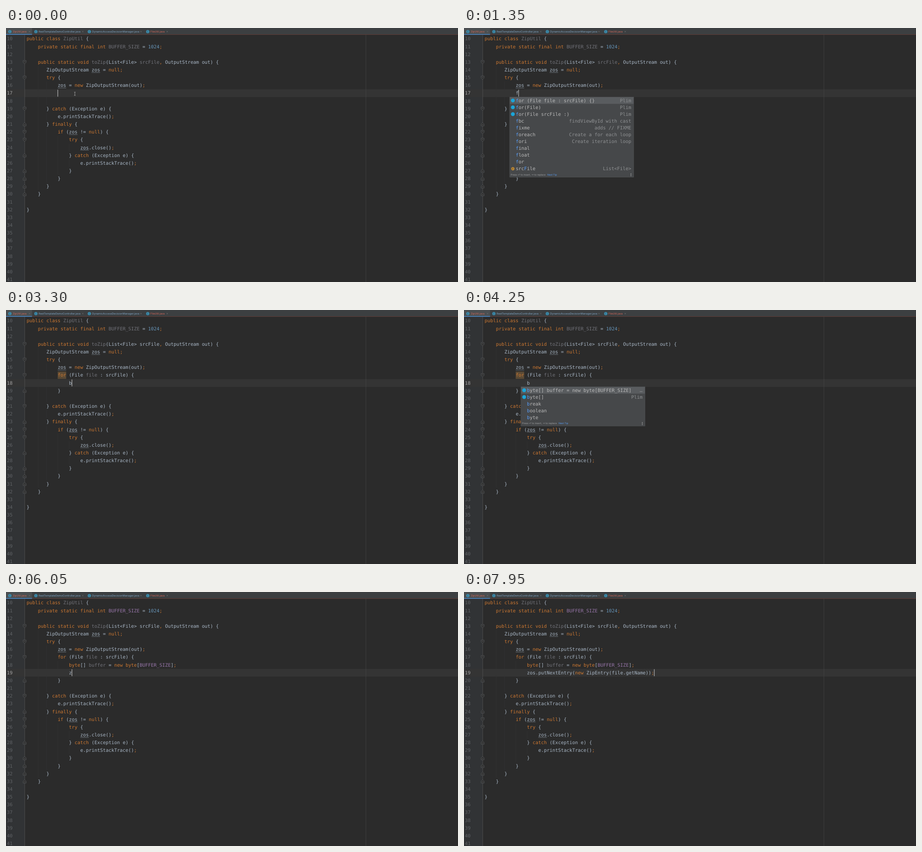
Recreate the animation shown at these times as an HTML page. Size 998x561 px, loop 8000 ms.

```html
<!DOCTYPE html>
<html lang="en">
<head>
<meta charset="utf-8">
<title>Code editor</title>
<style>
  html, body { margin: 0; width: 100%; height: 100%; overflow: hidden; background: #2b2b2b; }
  svg { display: block; width: 998px; height: 561px; }
  text { white-space: pre; text-rendering: geometricPrecision; }
  .code { font: 10.364px "DejaVu Sans Mono", monospace; }
  .ui { font-family: Inter, sans-serif; }
</style>
</head>
<body>
<svg id="stage" viewBox="0 0 998 561"></svg>
<script>
const LOOP = 8000, X0 = 45.5, CH = 6.24, TOP = 15.4, ROW = 17.15, FIRST = 10;
const C = {
  text: '#a9b7c6', key: '#cc7832', num: '#6897bb', dim: '#72737a', field: '#9876aa',
  match: '#589df6', pop: '#bbbbbb', tail: '#8f9193', logo: '#1ba5d8', param: '#c08a35'
};

const head = [
  [0, 'public class ZipUtil {'],
  [4, 'private static final int BUFFER_SIZE = 1024;'],
  [0, ''],
  [4, 'public static void toZip(List<File> srcFile, OutputStream out) {'],
  [7, 'ZipOutputStream zos = null;'],
  [7, 'try {'],
  [11, 'zos = new ZipOutputStream(out);']
];
const tail = [
  [0, ''],
  [7, '} catch (Exception e) {'],
  [11, 'e.printStackTrace();'],
  [7, '} finally {'],
  [11, 'if (zos != null) {'],
  [15, 'try {'],
  [19, 'zos.close();'],
  [15, '} catch (Exception e) {'],
  [19, 'e.printStackTrace();'],
  [15, '}'], [11, '}'], [7, '}'], [4, '}'], [0, ''], [0, '}']
];

const loop = 'for (File file : srcFile) {';
const bytes = 'byte[] buffer = new byte[BUFFER_SIZE]';
const body = (...inner) => [[11, loop], ...inner.map(s => [15, s]), [11, '}']];

// Popup rows: label, matched range, right-hand note, icon, bold
const hint = 'Press ⏎ to insert, ⇥ to replace';
const forPopup = {
  col: 11, line: 17, hint, rows: [
    ['for (File file : srcFile) {}', 0, 1, 'Plim', 'logo'],
    ['for(File)', 0, 1, 'Plim', 'logo'],
    ['for(File srcFile :)', 0, 1, 'Plim', 'logo'],
    ['fbc', 0, 1, 'findViewById with cast'],
    ['fixme', 0, 1, 'adds // FIXME'],
    ['foreach', 0, 1, 'Create a for each loop'],
    ['fori', 0, 1, 'Create iteration loop'],
    ['final', 0, 1, '', '', true],
    ['float', 0, 1, '', '', true],
    ['for', 0, 1, '', '', true],
    ['srcFile', 3, 4, 'List<File>', 'p']
  ]
};
const bytePopup = {
  col: 15, line: 18, hint, rows: [
    [bytes, 0, 1, '…', 'logo'],
    ['byte[]', 0, 1, 'Plim', 'logo'],
    ['break', 0, 1, '', '', true],
    ['boolean', 0, 1, '', '', true],
    ['byte', 0, 1, '', '', true]
  ]
};
const zosPopup = {
  col: 15, line: 19,
  hint: 'Press ^. to choose the selected (or first) suggestion and insert a dot afterwards',
  rows: [
    ['zos.putNextEntry(new ZipEntry(file.get…', 0, 2, '', 'logo'],
    ['zos', 0, 2, 'ZipOutputStream', 'v']
  ]
};

// Each step changes only the listed parts of the state
const steps = [
  [0, { mid: [[11, '']], line: 17, col: 11, on: true, mouse: true, popup: null, used: false, warn: false, brace: false, field: false }],
  [50, { mid: [[11, 'f']], col: 12, mouse: false }],
  [450, { popup: forPopup }],
  [850, { on: false }],
  [1250, { on: true }],
  [1550, { popup: null, mid: [[11, loop + '}']], col: 38, brace: true }],
  [1800, { used: true, warn: true }],
  [2350, { mid: body(''), line: 18, col: 15, brace: false }],
  [3250, { mid: body('b'), col: 16 }],
  [3450, { popup: bytePopup }],
  [4050, { on: false }],
  [4450, { popup: null, mid: body(bytes + ';'), col: 53, on: true }],
  [4700, { field: true, warn: false }],
  [5300, { mid: body(bytes + ';', ''), line: 19, col: 15 }],
  [6050, { mid: body(bytes + ';', 'z'), col: 16 }],
  [6250, { mid: body(bytes + ';', 'zo'), col: 17 }],
  [6300, { popup: zosPopup }],
  [7350, { popup: null, mid: body(bytes + ';', 'zos.putNextEntry(new ZipEntry(file.getName));'), col: 60 }]
];
const states = [];
steps.forEach(([, part], i) => states.push({ ...states[i - 1], ...part }));

const esc = s => s.replace(/&/g, '&amp;').replace(/</g, '&lt;');
const colX = c => X0 + c * CH;
const lineY = n => TOP + (n - FIRST) * ROW;
const rect = (x, y, w, h, fill, more = '') => `<rect x="${x}" y="${y}" width="${w}" height="${h}" fill="${fill}" ${more}/>`;
const dot = (x, y, r, fill) => `<circle cx="${x}" cy="${y}" r="${r}" fill="${fill}"/>`;
const path = (d, stroke, w = 0.8, fill = 'none') => `<path d="${d}" stroke="${stroke}" stroke-width="${w}" fill="${fill}"/>`;
const code = (x, y, s, fill, more = '') => `<text class="code" x="${x}" y="${y}" fill="${fill}" ${more}>${esc(s)}</text>`;
const ui = (x, y, s, fill, size, more = '') => `<text class="ui" x="${x}" y="${y}" fill="${fill}" font-size="${size}" ${more}>${esc(s)}</text>`;

const tokens = /\b(?:public|class|private|static|final|int|void|null|try|catch|finally|if|new|for|byte)\b|[;,]|\d+|BUFFER_SIZE|ZipUtil|toZip|srcFile(?=,)|file(?= :)|buffer|zos(?= =| !=|\.close)|[^\s]/g;

function tokenStyle(word, s) {
  if (word === 'BUFFER_SIZE') return [s.field ? C.field : C.dim, 'font-style="italic"'];
  if (/^(ZipUtil|toZip|file|buffer)$/.test(word)) return [C.dim];
  if (word === 'srcFile') return [s.used ? C.text : C.dim];
  if (/^\d/.test(word)) return [C.num];
  if (word === 'zos') return [C.text];
  if (word.length > 1 || /[;,]/.test(word)) return [C.key];
  return [C.text];
}

function codeLine([indent, src], n, s) {
  const y = lineY(n) + 12;
  let out = '', run = '', runCol = 0;
  const flush = () => { if (run) out += code(colX(runCol), y, run, C.text); run = ''; };
  for (const m of src.matchAll(tokens)) {
    const col = indent + m.index, [fill, more] = tokenStyle(m[0], s);
    if (m[0].length === 1 && fill === C.text && !(s.brace && n === 17 && /[{}]/.test(m[0]))) {
      if (runCol + run.length !== col) flush();
      if (!run) runCol = col;
      run += m[0];
      continue;
    }
    flush();
    const paired = /[{}]/.test(m[0]);
    if (paired) out += rect(colX(col), lineY(n) + 0.6, CH, 15.8, '#3b514d');
    out += code(colX(col), y, m[0], paired ? '#ffef28' : fill, more);
    if (m[0] === 'zos') out += rect(colX(col), y + 1.9, 3 * CH, 0.7, '#8c97a3');
  }
  flush();
  return out;
}

function foldMark([indent, src], n) {
  const closes = src[0] === '}' && !(indent === 7 && src.includes('catch'));
  const opens = src.endsWith('{');
  if (n === FIRST || (!opens && !closes) || !indent) return '';
  const y = lineY(n) + 8.6, k = closes ? -1 : 1;
  return path(`M37.8 ${y - 3.6 * k}h6.6v${4.4 * k}l-3.3 ${2.8 * k}l-3.3 ${-2.8 * k}z`, '#626567', 0.7, '#2b2b2b')
    + path(`M39.4 ${y - 0.7 * k}h3.4`, '#777a7c', 0.7);
}

function guides(lines) {
  let out = '';
  lines.forEach(([indent, src], i) => {
    if (!src.endsWith('{') || !indent) return;
    let end = i + 1;
    while (end < lines.length && (!lines[end][1] || lines[end][0] > indent)) end++;
    const x = colX(indent) + 0.5;
    out += path(`M${x} ${lineY(FIRST + i + 1)}V${lineY(FIRST + end)}`, '#353637', 0.7);
  });
  return out;
}

function tabs() {
  const list = [
    [8.5, 15, 'ZipUtil.java', 52, '#d5695b'],
    [66, 72, 'RestTemplateDemoController.java', 169.5, '#7fa5c4'],
    [184, 190, 'DynamicAccessDecisionManager.java', 298, '#7fa5c4'],
    [313, 319, 'FileUtil.java', 356, '#d5695b']
  ];
  let out = rect(0, 0, 998, 15, '#3c3f41') + rect(0, 0, 57.5, 15, '#4b4f51')
    + rect(0, 14.2, 998, 0.8, '#6a3b32') + rect(0, 13.4, 57.5, 1.6, '#4a88c7');
  for (const [ix, x, name, close, fill] of list) {
    out += dot(ix, 8, 3.6, '#3d91b3') + ui(ix, 9.8, 'C', '#26343b', 5, 'text-anchor="middle"')
      + ui(x, 10, name, fill, 5.8)
      + path(`M${close - 1.4} 6.5l2.8 2.8m0 -2.8l-2.8 2.8`, '#76797b', 0.6);
  }
  return out;
}

function popup(p) {
  const x = colX(p.col) - 13.3, y = lineY(p.line + 1) - 0.1, w = 274, pitch = 15.07;
  const right = x + w - 5.6, foot = y + p.rows.length * pitch;
  let out = rect(x, y, w, p.rows.length * pitch + 11.2, '#46484a', 'stroke="#55585a" stroke-width="0.6"')
    + rect(x + 0.4, y + 0.3, w - 0.8, pitch - 0.3, '#595c5f');
  p.rows.forEach(([label, from, to, note, icon, bold], i) => {
    const mid = y + 7.6 + i * pitch, base = mid + 3.6, tx = colX(p.col);
    const weight = bold ? 'font-weight="bold"' : '';
    const part = (a, b, fill) => a < b ? code(tx + a * CH, base, label.slice(a, b), fill, weight) : '';
    out += part(0, from, C.pop) + part(from, to, C.match) + part(to, label.length, C.pop);
    if (note) out += code(right, base, note, C.tail, 'text-anchor="end"');
    if (icon === 'logo') out += dot(x + 7, mid, 4.2, C.logo);
    else if (icon) out += dot(x + 7, mid, 3.6, C.param) + ui(x + 7, mid + 1.5, icon, '#4a3b20', 5, 'text-anchor="middle"');
  });
  out += `<text class="ui" x="${x + 2.4}" y="${foot + 7.4}" fill="#a0a2a4" font-size="5.25">${esc(p.hint)}<tspan dx="4" fill="${C.match}">Next Tip</tspan></text>`;
  for (const d of [-2.4, 0, 2.4]) out += dot(right - 0.6, foot + 5.8 + d, 0.75, '#c0c2c4');
  return out;
}

function draw(s) {
  const lines = [...head, ...s.mid, ...tail];
  let out = rect(0, 0, 998, 561, '#2b2b2b') + rect(0, 15, 41, 546, '#313335')
    + rect(0, lineY(s.line), 998, ROW, '#343434')
    + guides(lines)
    + rect(794.3, 15, 0.9, 546, '#434343') + rect(40.8, 15, 0.8, 546, '#555657');
  if (s.warn) out += rect(colX(11), lineY(17) + 0.4, 3 * CH, 16.2, '#5b4a35');
  for (let n = FIRST; n <= 41; n++)
    out += code(2, lineY(n) + 12, String(n), n === s.line ? '#a4a3a3' : '#606366');
  lines.forEach((l, i) => { out += foldMark(l, FIRST + i) + codeLine(l, FIRST + i, s); });
  if (s.on) out += rect(colX(s.col) - 0.3, lineY(s.line) + 0.8, 1.1, 15.4, '#c4c4c4');
  if (s.mouse) out += path('M150.4 141.4q1.6 0 1.6 1q0 -1 1.6 -1M152 142.2v6.2M150.4 149.2q1.6 0 1.6 -1q0 1 1.6 1', '#c8c8c8', 0.7);
  if (s.popup) out += popup(s.popup);
  return out + tabs();
}

const stage = document.getElementById('stage');
let shown = -1;
function tick() {
  const t = performance.now() % LOOP;
  let i = steps.length - 1;
  while (steps[i][0] > t) i--;
  if (i !== shown) stage.innerHTML = draw(states[shown = i]);
  requestAnimationFrame(tick);
}
tick();
</script>
</body>
</html>
```
